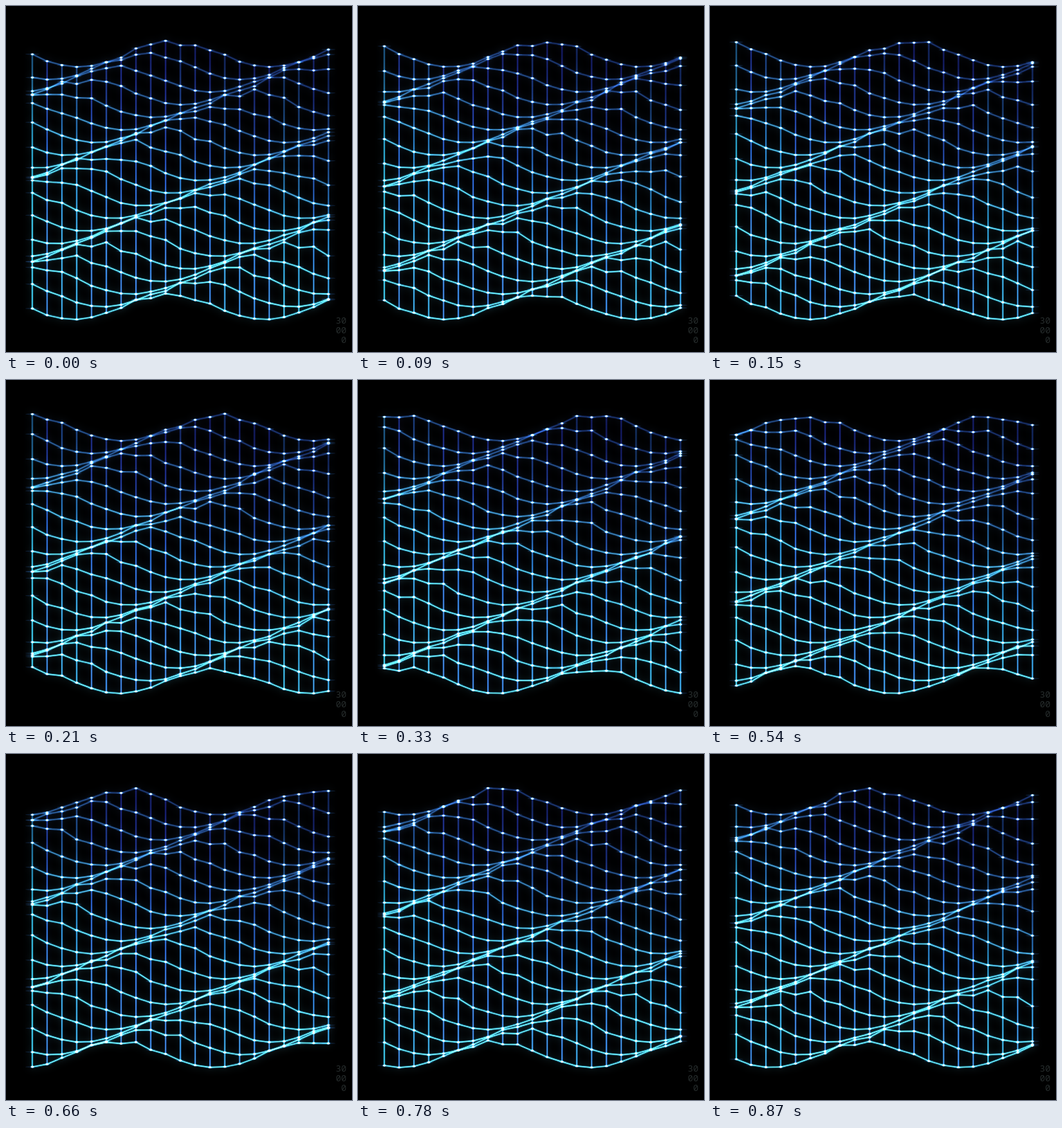
An HTML page with a canvas that plays this animation: 500x500 px, repeating every 900 ms.

```html
<!DOCTYPE html>
<html lang="en">
<head>
<meta charset="utf-8">
<title>Wave grid</title>
<style>
  html, body { margin: 0; width: 100%; height: 100%; overflow: hidden; background: #000; }
  canvas { display: block; width: 500px; height: 500px; }
</style>
</head>
<body>
<canvas id="stage" width="500" height="500"></canvas>
<script>
const LOOP = 900, STEP = 30, N = 21;
const LEFT = 38, DX = 21.4, TOP = 88, DY = 18.25;

const ctx = document.getElementById('stage').getContext('2d');
const layer = document.createElement('canvas');
layer.width = layer.height = 500;
const g = layer.getContext('2d');

const hash = (i, j) => {
  const v = Math.sin(i * 127.1 + j * 311.7 + 4.2) * 43758.5453;
  return v - Math.floor(v);
};

const colX = i => LEFT + DX * i;

// Each node bobs upwards from its rest line, by a slightly different height.
function nodeY(i, j, t) {
  const phase = 0.76 + 0.0775 * i + 0.151 * j - t;
  const rise = i ? 31 + 10 * hash(i, j) : 39;
  return TOP + DY * j - rise * (1 - Math.cos(2 * Math.PI * phase)) / 2;
}

// Colours run from the dim upper right to the bright lower left.
function ramp(...colors) {
  const grad = g.createLinearGradient(300, 70, 210, 366);
  colors.forEach((c, n) => grad.addColorStop(n / (colors.length - 1), c));
  return grad;
}
const rowInk = ramp('rgb(20,40,76)', 'rgb(40,82,120)', 'rgb(88,176,206)', 'rgb(104,204,228)');
const rowGlow = ramp('rgb(6,12,34)', 'rgb(8,24,46)', 'rgb(10,50,66)', 'rgb(10,54,68)');
const colInk = [], colGlow = [];
for (let i = 0; i < N; i++) {
  const hue = i ? 196 + 22 * hash(i, 50) : 192;
  colInk.push(ramp(`hsl(${hue + 18} 60% 15%)`, `hsl(${hue + 10} 60% 30%)`, `hsl(${hue} 64% 48%)`, `hsl(${hue} 70% 56%)`));
  colGlow.push(ramp(`hsl(${hue + 22} 75% 9%)`, `hsl(${hue + 14} 70% 10%)`, `hsl(${hue} 70% 13%)`));
}

function dot(x, y, rx, ry, color) {
  g.fillStyle = color;
  g.beginPath();
  g.ellipse(x, y, rx, ry, 0, 0, 2 * Math.PI);
  g.fill();
}

function stroke(path, ink, width) {
  g.strokeStyle = ink;
  g.lineWidth = width;
  g.stroke(path);
}

function drawLayer(t) {
  g.globalCompositeOperation = 'source-over';
  g.clearRect(0, 0, 500, 500);
  g.globalCompositeOperation = 'lighter';
  g.lineJoin = 'round';

  const rows = Array.from({ length: N }, (_, j) =>
    Array.from({ length: N }, (_, i) => nodeY(i, j, t)));

  for (let i = 0; i < N; i++) {
    const col = rows.map(row => row[i]);
    const path = new Path2D();
    path.moveTo(colX(i), Math.min(...col));
    path.lineTo(colX(i), Math.max(...col));
    stroke(path, colGlow[i], 3.2);
    stroke(path, colInk[i], 1.4);
  }

  for (const row of rows) {
    const path = new Path2D();
    row.forEach((y, i) => path.lineTo(colX(i), y));
    stroke(path, rowGlow, 3.6);
    stroke(path, rowInk, 1.4);
  }

  rows.forEach(row => row.forEach((y, i) => {
    const x = colX(i);
    const edge = i === 0 || i === N - 1;
    dot(x, y, edge ? 10 : 7, 0.9, 'rgba(30,76,140,.3)');
    dot(x, y, 3.2, 1.8, 'rgba(50,120,180,.4)');
    dot(x, y, 1.7, 1.3, 'rgba(235,250,255,.9)');
  }));
}

function drawLabel() {
  ctx.font = '13px "Noto Sans Mono", "DejaVu Sans Mono", monospace';
  ctx.textAlign = 'right';
  ctx.fillStyle = '#262c2c';
  ['30', '00', '0'].forEach((s, n) => ctx.fillText(s, 492, 459 + 14 * n));
}

function draw(t) {
  drawLayer(t);
  ctx.globalCompositeOperation = 'source-over';
  ctx.fillStyle = '#000';
  ctx.fillRect(0, 0, 500, 500);
  drawLabel();
  ctx.globalCompositeOperation = 'lighter';
  ctx.filter = 'blur(6px)';
  ctx.globalAlpha = 0.25;
  ctx.drawImage(layer, 0, 0);
  ctx.filter = 'none';
  ctx.globalAlpha = 1;
  ctx.drawImage(layer, 0, 0);
}

const start = performance.now();
function tick() {
  const ms = (performance.now() - start) % LOOP;
  draw(Math.floor(ms / STEP) * STEP / LOOP);
  requestAnimationFrame(tick);
}
tick();
</script>
</body>
</html>
```
